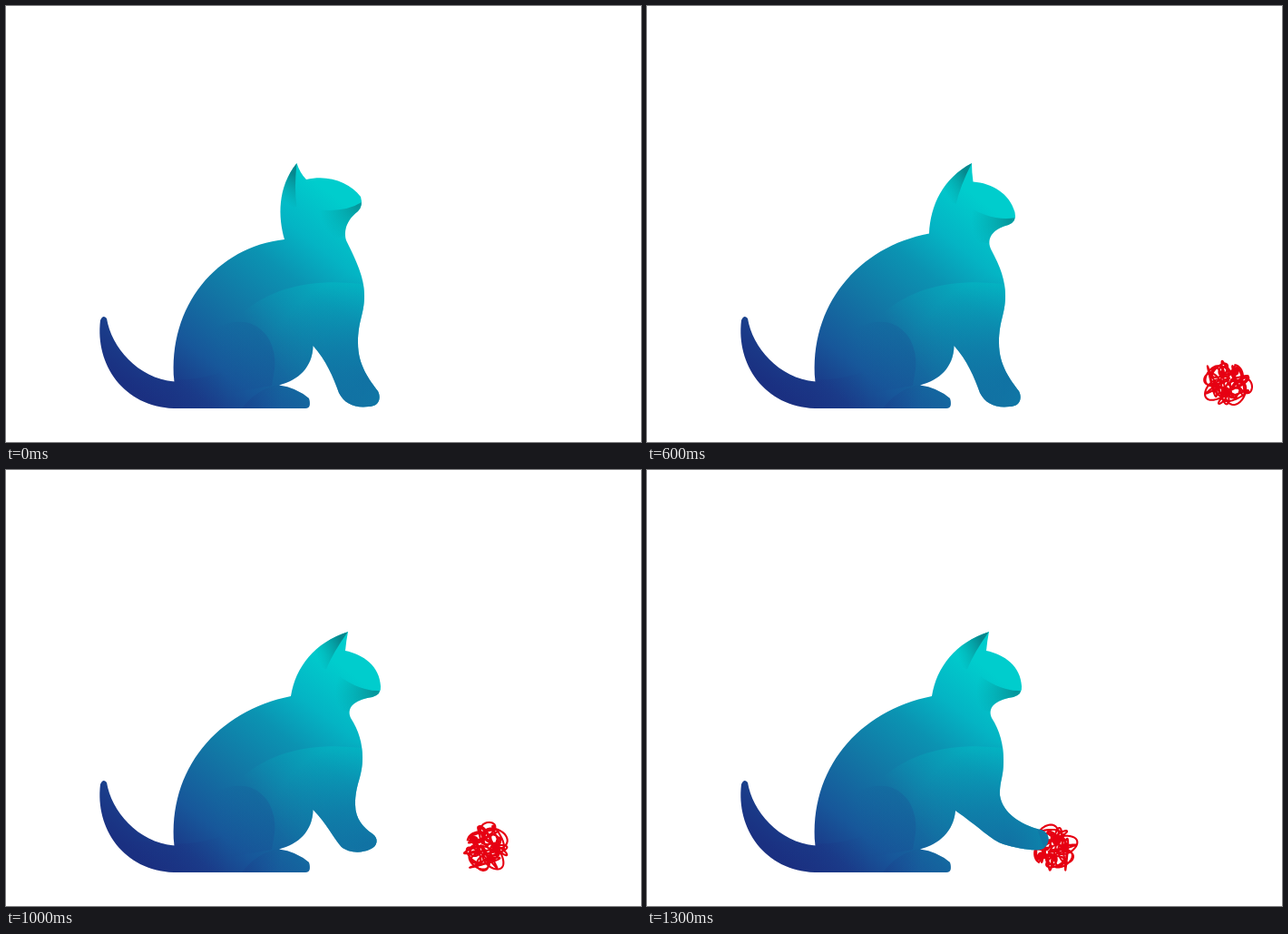
Animation of 700 by 480 pixels, one loop 2.2 s. Source, as an HTML page with a canvas:

```html
<!DOCTYPE html>
<html lang="en">
<head>
<meta charset="utf-8">
<title>Cat and yarn</title>
<style>
  html, body { margin: 0; width: 100%; height: 100%; overflow: hidden; background: #fff; }
  canvas { display: block; }
</style>
</head>
<body>
<canvas width="700" height="480"></canvas>
<script>
const ctx = document.querySelector('canvas').getContext('2d');
const LOOP = 2200;

// Key poses share one command structure, so their numbers can be blended.
const HEAD = [
  'M307 257 C300 232 299 200 320.5 173 Q324 184 331 191 C355 185 379 194 391 210 Q394 220 388 226 C380 232 371 243 375 258',
  'M308 252 C306 222 312 190 339 168 Q341 178 345 188 C366 187 387 196 398 216 Q402 227 393 232 C381 237 372 247 378 262',
  'M314 249 C319 217 340 190 377 178 Q375 188 374 199 C394 203 412 216 413 238 Q414 247 404 250 C389 252 374 259 380 273'
];
const HEAD_ANGLE = [0, 12, 30];
const LEG = [
  'C390 288 395 302 395 319 C395 340 388 346 388 371 C388 396 401 412 410 424 C414 432 411 441 400 441 C385 443 373 438 367 426 C361 409 353 390 338.5 374',
  'C388 286 391 300 391 314 C391 338 382 344 382 366 C382 373 388 376 398 377 C408 378 409 388 403 394 C397 402 382 405 372 403.5 C362 402 354 389 338.5 374',
  'C389 287 393 302 393 319 C393 340 389 340 389 358 C392 378 412 390 432 395.5 C445 398 445 410 438 416 C433 421 410 417 393 412 C380 408 365 392 340 375'
];
const REAR = 'C338 398 322 412 301 417.5 Q320 420 334 432 Q337 443 330 443 L185 443 ' +
  'C130 441 98 395 104 346 Q107 339 111 344 C116 375 145 410 185.5 413.5 C178 330 233 265 ';

const clamp = (v, lo, hi) => Math.min(hi, Math.max(lo, v));
const numbers = path => path.match(/-?[\d.]+/g).map(Number);

function blend(poses, k) {
  const i = Math.min(Math.floor(k), poses.length - 2);
  const from = numbers(String(poses[i])), to = numbers(String(poses[i + 1]));
  let n = 0;
  return String(poses[i]).replace(/-?[\d.]+/g, () => {
    const v = from[n] + (to[n] - from[n]) * (k - i);
    n++;
    return v;
  });
}

function addStops(gradient, stops) {
  for (const [at, color] of stops) gradient.addColorStop(at, color);
  return gradient;
}
const linear = (x0, y0, x1, y1, ...stops) => addStops(ctx.createLinearGradient(x0, y0, x1, y1), stops);
const radial = (x, y, r, ...stops) => addStops(ctx.createRadialGradient(x, y, 0, x, y, r), stops);

const coat = linear(165, 440, 350, 200,
  [0, '#1a3081'], [.12, '#1a3d8a'], [.25, '#17579a'], [.47, '#1277a5'],
  [.67, '#0b93b2'], [.82, '#04b4c4'], [1, '#00cdcd']);
const chestFill = linear(390, 305, 285, 375, [0, 'rgba(0,190,198,.55)'], [1, 'rgba(0,190,198,0)']);
const legFill = radial(400, 412, 115, [0, 'rgba(19,102,158,.75)'], [.4, 'rgba(19,102,158,.5)'], [1, 'rgba(19,102,158,0)']);
const thighFill = linear(297, 390, 238, 400, [0, 'rgba(26,62,140,.22)'], [1, 'rgba(26,62,140,0)']);
const footFill = linear(266, 432, 300, 442, [0, 'rgba(26,50,130,.2)'], [1, 'rgba(26,50,130,0)']);
const tailFill = radial(180, 425, 65, [0, 'rgba(27,46,128,.3)'], [1, 'rgba(27,46,128,0)']);
const earFill = linear(3, 16, -15, 42, [0, 'rgba(8,112,120,.75)'], [1, 'rgba(8,140,150,0)']);
const lipFill = radial(-4, 3, 44, [0, 'rgba(8,118,126,.65)'], [1, 'rgba(8,140,150,0)']);

function shade(path, fill, x = 0, y = 0, degrees = 0) {
  ctx.save();
  ctx.translate(x, y);
  ctx.rotate(degrees * Math.PI / 180);
  ctx.fillStyle = fill;
  ctx.fill(new Path2D(path));
  ctx.restore();
}

function drawCat(headPose, legPose) {
  const head = blend(HEAD, headPose);
  const p = numbers(head);
  const angle = Number(blend(HEAD_ANGLE, headPose));
  const outline = new Path2D(`${head} ${blend(LEG, legPose)} ${REAR} ${p[0]} ${p[1]} Z`);

  ctx.save();
  ctx.fillStyle = coat;
  ctx.fill(outline);
  ctx.clip(outline);
  shade('M225 400 C240 335 300 293 398 307 L450 450 L300 450 Z', chestFill);
  shade('M280 290 H460 V450 H280 Z', legFill);
  shade('M230 356 C270 333 300 362 296 400 L293 418 L225 430 Z', thighFill);
  shade('M260 443 Q278 420 302 417 L340 430 L338 445 Z', footFill);
  shade('M100 409 H160 Q205 417 245 400 V443 H100 Z', tailFill);
  shade('M0 0 L-25 25 L-22 52 L0 48 Q-3 28 0 0 Z', earFill, p[6], p[7], angle);
  shade('M0 0 Q-22 14 -62 6 L-45 45 L5 30 Z', lipFill, p[18] - 2, p[19] - 4, angle);
  ctx.restore();
}

// Tangled loops of uneven size wound around a ring.
const yarn = new Path2D();
for (let a = 0; a < 8 * Math.PI; a += .02) {
  const ring = 14 + 4 * Math.sin(2.7 * a), loop = 8 + 3 * Math.sin(1.9 * a);
  yarn.lineTo(ring * Math.cos(a) + loop * Math.cos(7.3 * a),
              ring * Math.sin(a) + loop * Math.sin(6.1 * a));
}

function drawBall(step) {
  ctx.save();
  ctx.translate(step < 2 ? 705 : 667 - 27.5 * (step - 2), 415.5);
  ctx.rotate(-step * 23 * Math.PI / 180);
  ctx.strokeStyle = '#e60012';
  ctx.lineWidth = 2.1;
  ctx.lineJoin = 'round';
  ctx.stroke(yarn);
  ctx.restore();
}

function draw() {
  const time = performance.now() % LOOP;
  const step = clamp(Math.floor((time - 300) / 100), 0, 10);
  ctx.clearRect(0, 0, 700, 480);
  if (step > 0) drawBall(step);
  drawCat(step < 2 ? 0 : Math.min(step / 2, 2), clamp((step - 6) / 2, 0, 2));
  requestAnimationFrame(draw);
}
draw();
</script>
</body>
</html>
```
